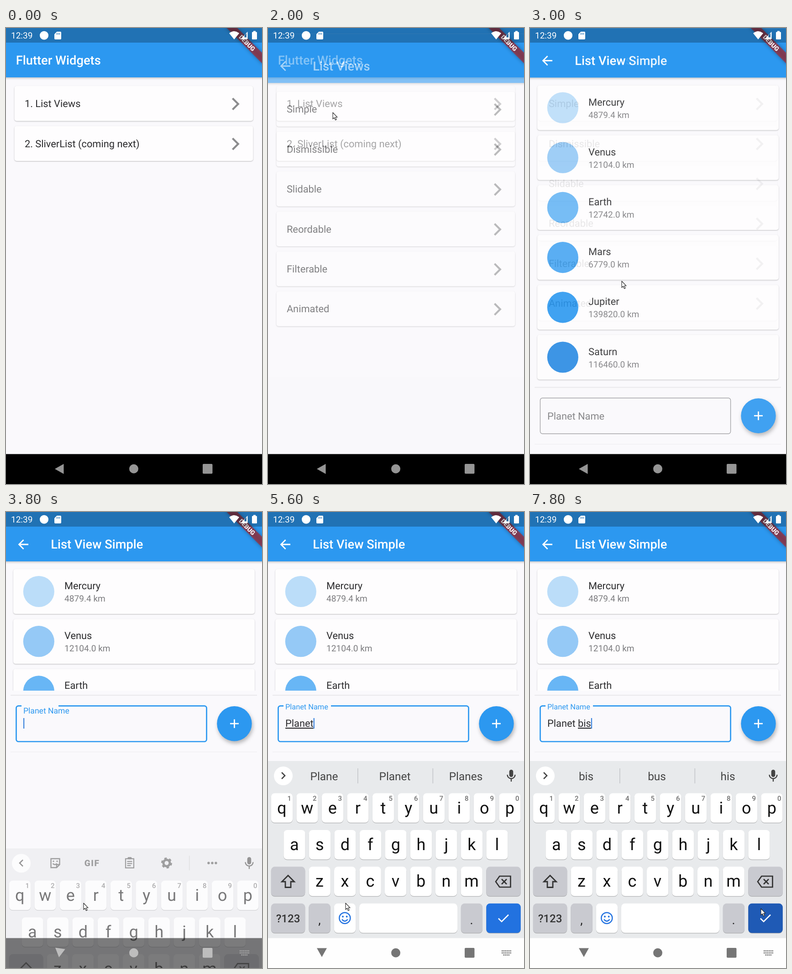
Write an HTML page that moves like this. It is 561 by 998 pixels and loops after 8 s.

```html
<!DOCTYPE html>
<html lang="en">
<head>
<meta charset="utf-8">
<title>Flutter Widgets</title>
<style>
  html, body { margin: 0; width: 100%; height: 100%; overflow: hidden; background: #faf9fc; }
  svg { display: block; width: 561px; height: 998px; font-family: Roboto, sans-serif; }
  text { white-space: pre; text-rendering: geometricPrecision; }
  .card { fill: #fefdfe; filter: drop-shadow(0 1px 1.2px rgba(0,0,0,.26)); }
  .bar { fill: #2c98f0; filter: drop-shadow(0 2px 2px rgba(0,0,0,.22)); }
  .fab { fill: #2c98f0; filter: drop-shadow(2px 5px 4px rgba(0,0,0,.28)); }
  .key { filter: drop-shadow(0 1px 0.5px rgba(0,0,0,.3)); }
  .line { fill: none; }
</style>
</head>
<body>
<svg id="stage" viewBox="0 0 561 998"></svg>
<script>
const BLUE = '#2c98f0', BG = '#faf9fc', INK = '#2b2b2d', SOFT = '#7c7c7f';
const LOOP = 8000, STEP = 200, FOCUS = 3716;

// Markup helpers
const text = (x, y, size, str, fill = INK, more = '') =>
  `<text x="${x}" y="${y}" font-size="${size}" fill="${fill}" ${more}>${str}</text>`;
const mid = (x, y, size, str, fill, more = '') =>
  text(x, y, size, str, fill, `text-anchor="middle" ${more}`);
const rect = (x, y, w, h, fill, r = 0, more = '') =>
  `<rect x="${x}" y="${y}" width="${w}" height="${h}" fill="${fill}" rx="${r}" ${more}/>`;
const circle = (x, y, r, fill, more = '') =>
  `<circle cx="${x}" cy="${y}" r="${r}" fill="${fill}" ${more}/>`;
const line = (d, stroke, width, more = '') =>
  `<path class="line" d="${d}" stroke="${stroke}" stroke-width="${width}" ${more}/>`;
const shape = (d, fill, more = '') => `<path d="${d}" fill="${fill}" ${more}/>`;
const group = (id, body) => `<g id="${id}">${body}</g>`;

// App pages
const appBar = (title, back) =>
  `<rect class="bar" x="-9" y="0" width="579" height="108"/>` +
  text(back ? 98.2 : 21.8, 80.4, 27.27, title, '#fff', 'font-weight="500"') +
  (back ? line('M49 71H29M38.5 61L28.5 71L38.5 81', '#fff', 2.8) : '');

const page = (id, title, back, body) =>
  group(id, rect(0, 0, 561, 932, BG) + body + appBar(title, back));

const menu = items => items.map((label, i) => {
  const y = 127 + i * 87.4;
  return `<rect class="card" x="18.5" y="${y}" width="523" height="76.5" rx="5"/>` +
    text(40.9, y + 46.2, 21.8, label) +
    line(`M496.5 ${y + 27}l12.3 12.3l-12.3 12.3`, '#8c8c8e', 4.2);
}).join('');

const planets = [
  ['Mercury', '4879.4', '#bbddf9'], ['Venus', '12104.0', '#95c9f6'],
  ['Earth', '12742.0', '#68b6f5'], ['Mars', '6779.0', '#48a6f2'],
  ['Jupiter', '139820.0', '#2b98f0'], ['Saturn', '116460.0', '#288ae3']
].map(([name, size, color], i) => {
  const y = 125 + i * 109.2;
  return `<rect class="card" x="16" y="${y}" width="529" height="98" rx="5"/>` +
    circle(71.8, y + 49, 34.1, color) +
    text(128, y + 44, 21.8, name) + text(128, y + 71, 19.1, size + ' km', SOFT);
}).join('');

const form = group('form',
  rect(10, 785, 540, 2, '#e9e8ec') + rect(10, 909.5, 540, 1.5, '#f1f0f4') +
  rect(22.4, 809.3, 417.2, 78.2, 'none', 5, 'id="box"') +
  rect(34, 806, 0, 6, BG, 0, 'id="gap"') +
  text(38, 856, 21.8, 'Planet Name', SOFT, 'id="label"') +
  text(38, 855, 21.8, '<tspan id="done"></tspan><tspan id="word" text-decoration="underline"></tspan>', INK, 'id="input"') +
  rect(38, 836, 2.2, 23, '#3b83dc', 0, 'id="caret"') +
  '<circle class="fab" cx="500.5" cy="848.2" r="38.2"/>' +
  line('M491 848.2h19M500.5 838.7v19', '#fff', 2.8));

// Keyboard
const GREY = '#c9cad0', DARK = '#444';
const key = (x, y, w = 47.3, fill = '#fff', more = '') =>
  rect(x, y, w, 64.5, fill, 8, 'class="key" ' + more);
const letters = (row, x0, y) => [...row].map((c, i) => {
  const x = x0 + i * 55.5;
  return key(x, y) + mid(x + 23.5, y + 44, 36, c, '#111') +
    (y < 620 ? mid(x + 40, 632, 15, (i + 1) % 10, '#707070', 'font-weight="500"') : '');
}).join('');

const mic = rect(528.7, 564, 8.6, 16, DARK, 4.3) +
  line('M524.5 575a8.5 8.5 0 0 0 17 0M533 583v7', DARK, 2.4);
const gear = circle(352, 577, 7, 'none', 'stroke="#555" stroke-width="5"') +
  circle(352, 577, 10.3, 'none', 'stroke="#555" stroke-width="3.5" stroke-dasharray="5.4 5.39"');
const tools = group('tools',
  line('M37 570l-7 7l7 7', DARK, 2.6) +
  line('M98.5 567.5h19v13l-6.5 6.5h-12.5zM111 587v-6.5h6.5M102.5 578q5 5 9 0', '#555', 2.4) +
  circle(104, 573, 1.6, '#555') + circle(112, 573, 1.6, '#555') +
  mid(188.5, 584, 19, 'GIF', '#555', 'font-weight="900" letter-spacing="1.5"') +
  line('M262 567.5h18v20h-18zM265.5 573.5h11M265.5 578h11M265.5 582.5h8', '#555', 2.2) +
  rect(266.5, 564, 9, 5, '#555', 2) + gear + rect(401, 561, 1.5, 32, '#ccc') +
  [444, 452, 460].map(x => circle(x, 577, 2.7, '#555')).join(''));
const hints = group('hints',
  line('M30 570l7 7l-7 7', DARK, 2.6) +
  rect(196, 561, 1.6, 33, '#c4c6c9') + rect(360.5, 561, 1.6, 33, '#c4c6c9') +
  [123, 278, 433.5].map(x => mid(x, 586.5, 24.4, '', DARK, 'class="hint"')).join(''));

const keyboard = group('keyboard',
  rect(0, 545, 561, 460, '#e8eaec') + circle(33.5, 577.5, 20.5, '#fff') +
  tools + hints + mic +
  letters('qwertyuiop', 6.8, 615.5) + letters('asdfghjkl', 34.3, 696) + letters('zxcvbnm', 89.5, 776.3) +
  key(6.8, 776.3, 74.5, GREY) + line('M44 795.5l-13.5 13.5h7.5v12.5h12v-12.5h7.5z', '#333', 2.8) +
  key(478.3, 776.3, 75.5, GREY) +
  line('M499 809l8.5-12h24v24h-24zM512 803.5l11 11M523 803.5l-11 11', '#333', 2.7) +
  key(6.8, 856.8, 74.5, GREY) + mid(44, 898, 24, '?123', '#333', 'font-weight="500"') +
  key(89.5, 856.8, 47.3, GREY) + mid(113, 902, 27, ',', '#222') +
  key(144.8, 856.8) + circle(168.3, 888.7, 12, 'none', 'stroke="#2272e0" stroke-width="2.5"') +
  circle(164, 885.5, 1.9, '#2272e0') + circle(172.6, 885.5, 1.9, '#2272e0') +
  line('M162 891.5q6.3 8 12.6 0', '#2272e0', 2.3) +
  key(200, 856.8, 215) + key(422.8, 856.8, 47.3, GREY) + mid(446, 902, 27, '.', '#222') +
  key(478.3, 856.8, 75.5, '#2272e0', 'id="enter"') + line('M505 889.5l7 7l15-15', '#fff', 2.6));

// System bars
const banner = `<g transform="translate(561 0) rotate(45)">` +
  rect(-60, 38.2, 120, 16.4, '#b71c1c', 0, 'fill-opacity=".63" style="filter:drop-shadow(0 0 4px rgba(0,0,0,.5))"') +
  mid(0, 51.2, 13.6, 'DEBUG', '#fff', 'font-weight="900"') + '</g>';
const status = rect(0, 0, 561, 32, '#000', 0, 'fill-opacity=".25"') +
  text(11, 23.3, 19, '12:39', '#fff') + circle(83.5, 16.3, 9.5, '#fff') +
  shape('M111.5 8H119q2 0 2 2V23q0 2-2 2H108q-2 0-2-2V13.5z', '#fff') +
  line('M111.5 11v3.5M114.5 11v3.5M117.5 11v3.5', '#2172b4', 1.3) +
  shape('M489 11.5Q500 2.5 511 11.5L500 25z', '#fff') +
  shape('M514 24.5L529.5 8V24.5z', '#fff') + shape('M522.5 20.5V16l4.5-4.5v9z', '#2a6aa0') +
  shape('M542 6.5h5v2h1.5q1.5 0 1.5 1.5V23.5q0 1.5-1.5 1.5h-8q-1.5 0-1.5-1.5V10q0-1.5 1.5-1.5h1.5z', '#fff');
const nav = rect(0, 932.5, 561, 66, '#000', 0, 'id="navBg"') +
  group('navIcons',
    '<path id="back" d="M107 965L126.5 954V976z"/><circle cx="280" cy="964.7" r="10"/>' +
    '<rect x="431" y="954" width="21.5" height="21.5" rx="2"/>') +
  line('M512 960.5h21M512 965h21M515.5 969.5h14', '#757575', 2.4, 'id="keysIcon" stroke-dasharray="2.6 1.1"');

document.getElementById('stage').innerHTML =
  '<clipPath id="listClip"><rect id="listBox" width="561" height="776"/></clipPath>' +
  page('home', 'Flutter Widgets', false, menu(['1. List Views', '2. SliverList (coming next)'])) +
  page('lists', 'List Views', true,
    menu(['Simple', 'Dismissible', 'Slidable', 'Reordable', 'Filterable', 'Animated'])) +
  page('simple', 'List View Simple', true, `<g clip-path="url(#listClip)">${planets}</g>` + form) +
  banner + keyboard + nav + status +
  shape('M0 0V14.2L3.3 11.2L5.6 16.5L8 15.5L5.7 10.3H10z', '#fff',
    'id="pointer" stroke="#222" stroke-width="1.1" stroke-linejoin="round"');

// Animation
const $ = id => document.getElementById(id);
const set = (id, attrs) => { for (const k in attrs) $(id).setAttribute(k, attrs[k]); };
const clamp = v => Math.max(0, Math.min(1, v));
const mix = (a, b, f) => a + (b - a) * f;
const show = on => on ? 'visible' : 'hidden';

const bezier = (x1, y1, x2, y2) => x => {
  const at = (a, b, s) => 3 * (1 - s) ** 2 * s * a + 3 * (1 - s) * s * s * b + s ** 3;
  let lo = 0, hi = 1;
  for (let i = 0; i < 24; i++) {
    const s = (lo + hi) / 2;
    if (at(x1, x2, s) < x) lo = s; else hi = s;
  }
  return at(y1, y2, hi);
};
const easeIn = bezier(.42, 0, 1, 1), standard = bezier(.4, 0, .2, 1);

const path = [[1400, 330, 420], [1800, 142, 185], [2800, 142, 185], [3000, 201, 554],
  [3400, 170, 856], [6800, 170, 856], [7400, 506, 868], [LOOP, 506, 868]];
const suggestions = [[4800, 'P Please Pic'], [5000, 'Pl Please Place'], [5200, 'Pla Play Place'],
  [5400, 'Plan Plane Plans'], [5600, 'Plane Planet Planes'], [5800, 'is of and'],
  [6400, 'b be by'], [6600, 'bi bit big'], [6800, 'bis bus his']];

function enterPage(id, t, start) {
  const f = clamp((t - start) / 300);
  set(id, {
    visibility: show(f > 0), opacity: easeIn(f),
    transform: `translate(0 ${233 * (1 - standard(f))})`
  });
}

function movePointer(t) {
  set('pointer', { visibility: show(t >= path[0][0]) });
  const i = path.findIndex(p => p[0] > t);
  if (i < 1) return;
  const [a, b] = [path[i - 1], path[i]], f = (t - a[0]) / (b[0] - a[0]);
  set('pointer', { transform: `translate(${mix(a[1], b[1], f)} ${mix(a[2], b[2], f)})` });
}

function drawForm(t) {
  const focus = t >= FOCUS, f = focus ? standard(clamp((t - FOCUS) / 167)) : 0;
  const count = t < 4800 ? 0 : t < 6200 ? Math.min(7, 2 + (t - 4800) / STEP) : Math.min(10, 8 + (t - 6200) / STEP);
  const typed = 'Planet bis'.slice(0, count), cut = typed.indexOf(' ') + 1;
  set('form', { transform: `translate(0 ${focus ? -385 : 0})` });
  set('listBox', { height: focus ? 391 : 776 });
  set('box', { stroke: focus ? BLUE : '#9c9c9f', 'stroke-width': focus ? 2.7 : 1.4 });
  set('gap', { width: 104 * f });
  set('label', { y: mix(856, 817, f), 'font-size': mix(21.8, 16.35, f), fill: focus ? BLUE : SOFT });
  $('done').textContent = typed.slice(0, cut);
  $('word').textContent = typed.slice(cut);
  const width = count ? $('input').getComputedTextLength() : 0;
  set('caret', { x: 38 + width, visibility: show(focus && !(t >= 7400 && t < 7800)) });
}

function drawKeyboard(t) {
  const k = clamp((t - 3660) / 285), up = k === 1;
  set('keyboard', {
    visibility: show(k > 0), opacity: up ? 1 : k + .06,
    transform: `translate(0 ${376 * (1 - k)})`
  });
  const current = suggestions.filter(s => s[0] <= t).pop();
  set('tools', { visibility: show(k > 0 && !current) });
  set('hints', { visibility: show(current) });
  const words = current ? current[1].split(' ') : [];
  document.querySelectorAll('.hint').forEach((el, i) => el.textContent = words[i] || '');
  set('enter', { fill: t >= 7800 ? '#1f5ab5' : '#2272e0' });
  set('navBg', { fill: up ? '#fefefe' : '#000', 'fill-opacity': up || !k ? 1 : 1 - k });
  set('navIcons', { fill: up ? '#757575' : k ? '#bdbdbd' : '#959595' });
  set('back', { transform: `translate(${k} ${-k}) rotate(${-90 * clamp(k * 1.85)} 117 965)` });
  set('keysIcon', { visibility: show(k > 0), stroke: up ? '#757575' : '#a5a5a5' });
}

const begin = performance.now();
function frame(now) {
  const t = Math.floor(Math.max(0, now - begin) % LOOP / STEP) * STEP;
  enterPage('lists', t, 1784);
  enterPage('simple', t, 2719);
  drawForm(t);
  drawKeyboard(t);
  movePointer(t);
  requestAnimationFrame(frame);
}
frame(begin);
</script>
</body>
</html>
```
